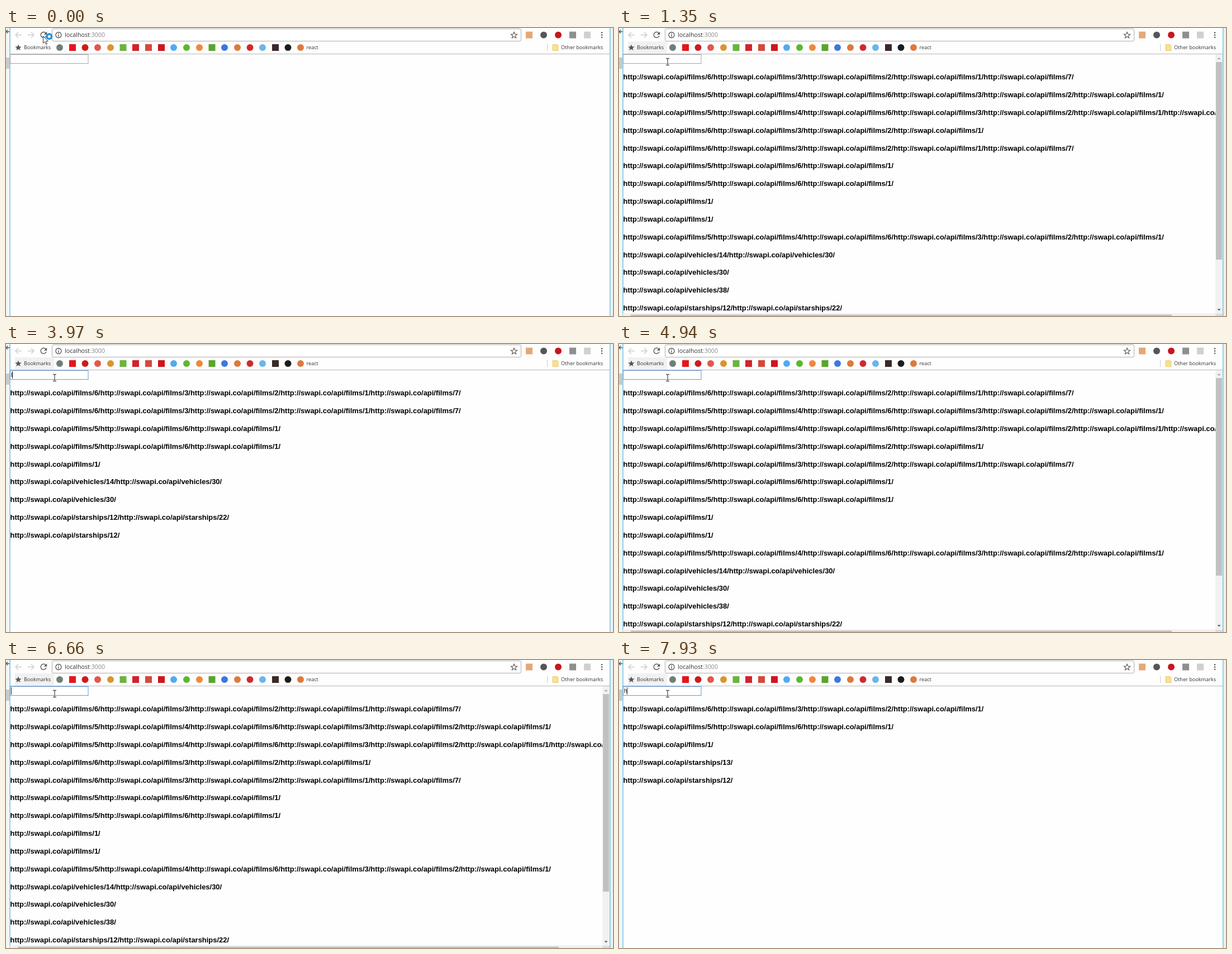
Animation, 1086 px wide and 516 px high, one loop 8 s. Source, as an HTML page:

```html
<!DOCTYPE html>
<html lang="en">
<head>
<meta charset="utf-8">
<title>Filtered list</title>
<style>
  html, body { margin: 0; width: 100%; height: 100%; overflow: hidden; background: #fefefe; }
  svg { display: block; width: 100vw; height: 100vh; }
  .ui { font: 9.15px "Open Sans", sans-serif; fill: #333; }
  .address { font: 10.7px "Open Sans", sans-serif; fill: #333; }
  .typed { font: 10.7px "Liberation Sans", Arial, sans-serif; fill: #111; }
  #rows { font: bold 12.96px "Liberation Sans", Arial, sans-serif; fill: #000; }
  .line { fill: none; stroke: #555; stroke-width: 1.3; }
  .faint { stroke: #ccc; }
</style>
</head>
<body>
<svg viewBox="0 0 1086 516" preserveAspectRatio="none">
  <defs>
    <clipPath id="page"><rect x="7" y="47" width="1060" height="464"/></clipPath>
    <path id="star" d="M0-5.6 1.6-1.8 5.7-1.6 2.5 1 3.6 5 0 2.7-3.6 5-2.5 1-5.7-1.6-1.6-1.8Z"/>
  </defs>

  <!-- window and toolbar -->
  <rect width="1086" height="516" fill="#fefefe"/>
  <rect width="6" height="516" fill="#f5f5f5"/>
  <rect y="53" width="6" height="20" fill="#c9c9c9"/>
  <path class="line" d="M0 6.5H7M0 6.5 3 3.5M0 6.5 3 9.5" stroke-width="1"/>
  <rect x="1082" width="4" height="516" fill="#eee"/>
  <rect id="hover" x="16" y="24" width="70" height="22" fill="#f1f1f1"/>
  <path d="M7 46.5H1080" stroke="#b6b6b6"/>
  <path d="M7 0V516M1080.7 0V516" stroke="#66bfe0" stroke-width="1.4"/>
  <circle id="press" cx="67.5" cy="12.5" r="9.5" fill="#eee"/>
  <path class="line faint" d="M28 12.5H17M22 7.5 17 12.5 22 17.5M39 12.5H50M45 7.5 50 12.5 45 17.5"/>
  <path class="line" d="M71.2 9.2A5 5 0 1 0 72 13.7" stroke-width="1.6"/>
  <path d="M73.2 6.5V11.8H67.9Z" fill="#555"/>
  <rect x="82.5" y="1.5" width="839" height="22" rx="2" fill="#fff" stroke="#adadad"/>
  <circle class="line" cx="94" cy="12.5" r="5" stroke-width="1.1"/>
  <path class="line" d="M94 9.3V10.6M94 11.6V15.7"/>
  <text class="address" x="105" y="16.4">localhost<tspan fill="#888">:3000</tspan></text>
  <use href="#star" x="909" y="12.8" class="line" style="stroke-width:1.1"/>
  <g fill="#555"><circle cx="1066" cy="8.3" r="1.3"/><circle cx="1066" cy="12.5" r="1.3"/><circle cx="1066" cy="16.7" r="1.3"/></g>
  <use href="#star" x="22" y="35" fill="#555"/>
  <text class="ui" x="32" y="38.3">Bookmarks</text>
  <text class="ui" x="537.5" y="38.3">react</text>
  <path d="M968.5 28V41" stroke="#ccc"/>
  <path d="M978 29.5H986V31H988V40.5H978Z" fill="#fae08c" stroke="#e3c262" stroke-width=".7"/>
  <text class="ui" x="993" y="38.3">Other bookmarks</text>
  <g id="icons"></g>

  <!-- page -->
  <g id="rows" clip-path="url(#page)"></g>
  <g id="scrollbars">
    <path d="M1067 47H1080V516H7V511H1067Z" fill="#f1f1f1"/>
    <path d="M1068 61H1079V415H1068ZM21 513.5H989V516H21Z" fill="#c1c1c1"/>
    <path d="M1067 512H1080V516H1067Z" fill="#dcdcdc"/>
    <path d="M1070.5 56 1073.5 53 1076.5 56Z" fill="#a3a3a3"/>
    <path d="M1070.5 503.5H1076.5L1073.5 506.5Z" fill="#505050"/>
  </g>
  <rect id="field" x="7.5" y="47.5" width="139.5" height="16" fill="#fff"/>
  <text id="typed" class="typed" x="9" y="59.3"></text>
  <rect id="caret" y="49" width="1" height="13" fill="#222"/>

  <!-- pointers -->
  <g id="arrow">
    <path d="M.5 .5V13.2L3.4 10.5 5.5 15.4 7.6 14.5 5.5 9.7H9.4Z" fill="#fff" stroke="#222" stroke-width=".9"/>
    <g id="busy"><circle cx="11.3" cy="1.2" r="4.3" fill="#fff" stroke="#2196e3" stroke-width="3.6"/></g>
  </g>
  <path id="beam" class="line" d="M-3-6H-1L0-5 1-6H3M0-5V5M-3 6H-1L0 5 1 6H3" stroke-width="1.1"/>
</svg>
<script>
const $ = id => document.getElementById(id);
const DURATION = 8000;

// Each icon: centre x, colour, and whether it is round.
const icon = y => ([x, color, round]) => round
  ? `<circle cx="${x}" cy="${y}" r="6" fill="${color}"/>`
  : `<rect x="${x - 6}" y="${y - 6}" width="12" height="12" fill="${color}"/>`;
const bookmarks = [
  [96, '#6f7f78', 1], [119, '#e8141c'], [141.5, '#cc1a1e', 1], [164, '#e2574c', 1],
  [187, '#d9952f', 1], [209.5, '#6cb33f'], [232, '#d3222a'], [255, '#d5483d'],
  [278, '#d1141b'], [300, '#50abf1', 1], [323, '#5cb82c', 1], [346, '#f0883a', 1],
  [368.5, '#5aa52c'], [391, '#3b78e0', 1], [414, '#dd7a3c', 1], [436.5, '#cf2a30', 1],
  [459, '#6bb5ea', 1], [482, '#3a2a28'], [504.5, '#1c1c1c', 1], [527, '#dd7a3c', 1]
];
const extensions = [
  [936, '#e3a878'], [962, '#55565a', 1], [988, '#c8161d', 1], [1014, '#8f8f8f'], [1040, '#d0d0d0']
];
$('icons').innerHTML = bookmarks.map(icon(35)).join('') + extensions.map(icon(12.5)).join('');

const results = {
  '': ['films 6 3 2 1 7', 'films 5 4 6 3 2 1', 'films 5 4 6 3 2 1 7', 'films 6 3 2 1', 'films 6 3 2 1 7',
       'films 5 6 1', 'films 5 6 1', 'films 1', 'films 1', 'films 5 4 6 3 2 1',
       'vehicles 14 30', 'vehicles 30', 'vehicles 38', 'starships 12 22'],
  l: ['films 6 3 2 1 7', 'films 6 3 2 1 7', 'films 5 6 1', 'films 5 6 1', 'films 1',
      'vehicles 14 30', 'vehicles 30', 'starships 12 22', 'starships 12'],
  o: ['films 5 4 6 3 2 1', 'films 6 3 2 1 7', 'films 5 6 1', 'films 5 4 6 3 2 1',
      'vehicles 30', 'vehicles 38', 'starships 48 59 64 65 74'],
  h: ['films 6 3 2 1', 'films 5 6 1', 'films 1', 'starships 13', 'starships 12']
};
const LOADED = 440, FOCUSED = 1660;
const queries = [[0, ''], [2880, 'l'], [4480, ''], [5530, 'o'], [6660, ''], [7930, 'h']];
const blinks = [FOCUSED, 2200, 2730, 3440, 3970, 4940, 5530, 6100, 6530, 7240, 7800];
const pointer = [
  [0, 'arrow', 66, 14], [820, 'arrow', 75, 35], [970, 'arrow', 77, 39],
  [1090, 'beam', 82, 60.5], [1230, 'beam', 85, 60.5], [1350, 'beam', 87, 60.5]
];

const latest = (steps, t) => steps.filter(step => step[0] <= t).pop();
const show = (id, on) => $(id).setAttribute('visibility', on ? 'visible' : 'hidden');

function rowMarkup(row, index) {
  const [kind, ...ids] = row.split(' ');
  const urls = ids.map(id => `http://swapi.co/api/${kind}/${id}/`).join('');
  return `<text x="7.5" y="${92.3 + index * 31.83}">${urls}</text>`;
}

let shown;
function render(t) {
  const query = latest(queries, t)[1];
  const loaded = t >= LOADED;
  const state = loaded + query;
  if (state !== shown) {
    shown = state;
    $('rows').innerHTML = loaded ? results[query].map(rowMarkup).join('') : '';
    $('typed').textContent = query;
    show('scrollbars', loaded && !query);
  }
  const width = query ? $('typed').getComputedTextLength() : 0;
  $('caret').setAttribute('x', Math.floor(9 + width));
  show('caret', blinks.filter(time => time <= t).length % 2);
  $('field').setAttribute('stroke', t >= FOCUSED ? '#5e9ad6' : '#a6a6a6');

  const [, shape, x, y] = latest(pointer, t);
  $(shape).setAttribute('transform', `translate(${x} ${y})`);
  show('arrow', shape === 'arrow');
  show('beam', shape === 'beam');
  show('busy', t < 820);
  show('press', t >= 580 && t < 820);
  show('hover', t >= 970);
}

function frame() {
  render(performance.now() % DURATION);
  requestAnimationFrame(frame);
}
frame();
</script>
</body>
</html>
```
